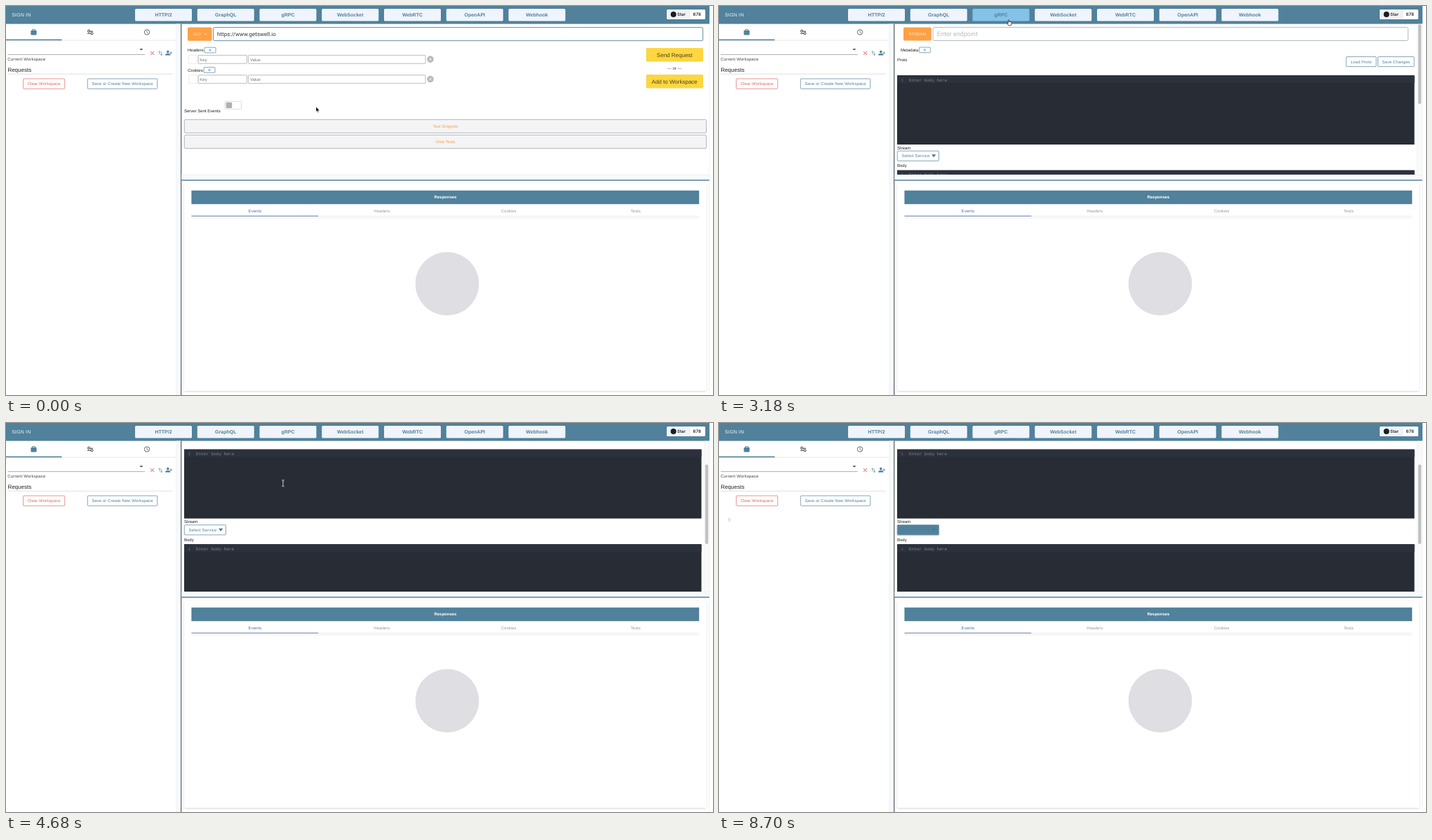
An HTML page for the animation above (9.82 s loop, 1008 by 556 pixels).

```html
<!DOCTYPE html>
<html lang="en">
<head>
<meta charset="utf-8">
<title>API client</title>
<style>
  html, body { margin: 0; width: 100%; height: 100%; overflow: hidden; background: #fff; }
  svg { display: block; width: 1008px; height: 556px; }
  text { font-family: "Liberation Sans", Arial, sans-serif; white-space: pre; text-rendering: geometricPrecision; }
  .ui { font-family: Roboto, sans-serif; }
  .badge { font-family: Inter, sans-serif; font-weight: 600; }
  .code { font-family: "Liberation Mono", monospace; }
  .bold { font-weight: 700; }
</style>
</head>
<body>
<svg id="stage" viewBox="0 0 1008 556">
  <defs>
    <clipPath id="view"><rect x="250" y="25.5" width="753" height="215.7"/></clipPath>
    <filter id="shadow" x="-5%" y="-5%" width="110%" height="110%">
      <feDropShadow dx="0" dy="1" stdDeviation="1.8" flood-color="#0a0a0a" flood-opacity=".16"/>
    </filter>
  </defs>
</svg>
<script>
const BLUE = '#51819b', INK = '#222', YELLOW = '#fdd640', ORANGE = '#ffa044';
const LOOP = 9820;
const stage = document.getElementById('stage');
let layer = stage;

function el(tag, attrs, text) {
  const node = document.createElementNS('http://www.w3.org/2000/svg', tag);
  for (const key in attrs) node.setAttribute(key, attrs[key]);
  if (text) node.textContent = text;
  return layer.appendChild(node);
}
function group(attrs, build) {
  const outer = layer, g = el('g', attrs);
  layer = g;
  build();
  layer = outer;
  return g;
}
// Box given by its edges.
const box = (x1, y1, x2, y2, fill, more) =>
  el('rect', { x: x1, y: y1, width: x2 - x1, height: y2 - y1, fill, ...more });
const outline = (x1, y1, x2, y2, stroke, rx = 1, fill = '#fff', width = .7) =>
  box(x1, y1, x2, y2, fill, { stroke, rx, 'stroke-width': width });
const path = (d, stroke, width = .8, fill = 'none', more) =>
  el('path', { d, stroke, 'stroke-width': width, fill, ...more });
const dot = (cx, cy, r, fill, more) => el('circle', { cx, cy, r, fill, ...more });
const label = (x, y, text, size = 6, fill = INK, more) =>
  el('text', { x, y, 'font-size': size, fill, ...more }, text);
const centered = (x, y, text, size, fill, more) =>
  label(x, y, text, size, fill, { 'text-anchor': 'middle', ...more });

function button(x1, y1, x2, y2, text, color, spacing = .05) {
  outline(x1, y1, x2, y2, color);
  centered((x1 + x2) / 2, (y1 + y2) / 2 + 2.1, text, 6, color, { 'letter-spacing': spacing });
}
function plus(x, y) {
  outline(x, y, x + 16, y + 7.7, BLUE);
  path(`M${x + 6} ${y + 3.9}h4m-2 -2v4`, BLUE, .6);
}

// Top bar
box(0, 0, 1003, 25.6, BLUE);
label(8.2, 15.3, 'SIGN IN', 7, '#eef4f8', { 'letter-spacing': .17 });
let grpcButton;
['HTTP/2', 'GraphQL', 'gRPC', 'WebSocket', 'WebRTC', 'OpenAPI', 'Webhook'].forEach((name, i) => {
  const x = 184 + i * 88.75;
  const r = box(x, 4, x + 81, 21.5, '#f0f4fc', { rx: 1.5 });
  if (name === 'gRPC') grpcButton = r;
  centered(x + 40.5, 15.3, name, 7, BLUE, { class: 'bold' });
});
box(942, 5, 997, 19, '#fff', { rx: 1.5 });
box(942.3, 5.3, 974.5, 18.7, '#f0f3f6', { rx: 1.5 });
path('M974.7 5V19', '#d5dade', .5);
dot(951.6, 12, 4, '#1b1f24');
label(957, 14.1, 'Star', 6, '#24292f', { class: 'badge' });
label(979.6, 14.1, '678', 6.2, '#24292f', { class: 'badge' });

// Sidebar
path('M0 49.1H243', '#dbdbdb', .6);
box(0, 47.6, 79.5, 49.2, BLUE);
path('M37.6 35v-1.3h3.8V35', BLUE, 1);
box(35.4, 35, 43.6, 41.4, BLUE, { rx: .8 });
dot(118, 35.7, 1.5, 'none', { stroke: '#333', 'stroke-width': 1 });
dot(122.5, 39.3, 1.5, 'none', { stroke: '#333', 'stroke-width': 1 });
path('M119.3 36.2H124M116 39.2h5', '#333', 1);
dot(201, 37.5, 3.7, 'none', { stroke: '#444', 'stroke-width': .8 });
path('M201 35.2v2.5l1.8 1.2', '#444', .7);
path('M2.5 69.4H198', '#8b8b8b', .7);
path('M190.4 61h5l-2.5 2.6z', 'none', 0, '#555');
path('M206 64.9l5 5m0 -5l-5 5', '#d9453f', .9);
path('M219 69V64.6m-1.5 1.5l1.5 -1.5l1.5 1.5M221.7 66v4.5m-1.5 -1.5l1.5 1.5l1.5 -1.5', BLUE, .7);
dot(230.8, 65.4, 1.8, BLUE);
path('M227.2 70.6v-.8q0 -2 3.6 -2t3.6 2v.8z', 'none', 0, BLUE);
path('M233.4 67h3.6m-1.8 -1.8v3.6', BLUE, .8);
label(2.3, 77.7, 'Current Workspace', 6, '#444', { 'letter-spacing': .15 });
label(2.4, 93.7, 'Requests', 8);
path('M2.5 97.3H238', '#d5d5d5', .7);
button(24.6, 104, 83.7, 118.3, 'Clear Workspace', '#dd6763', .07);
button(116.3, 104, 215.7, 118.3, 'Save or Create New Workspace', BLUE, .07);
box(242.6, 25.6, 249, 556, '#f8f9fb');
path('M242.6 25.6V556', '#e6e8ea', .5);
path('M249.7 25.6V556', '#4f5b65', 1.2);

function kvRow(name, x, y) {
  label(259, y + 2.3, name);
  plus(x, y - 3.8);
  outline(260.3, y + 7.2, 272.5, y + 19.4, '#dcdcdc', .5, '#fff', .6);
  outline(274.3, y + 7.4, 343.5, y + 19.2, '#8f8f8f', .8, '#fff', .6);
  outline(345.6, y + 7.4, 598, y + 19.2, '#8f8f8f', .8, '#fff', .6);
  label(276.3, y + 15.6, 'Key', 6, '#757575');
  label(348, y + 15.6, 'Value', 6, '#757575');
  dot(605, y + 13.1, 4.8, '#bababa');
  path(`M603.2 ${y + 11.3}l3.6 3.6m0 -3.6l-3.6 3.6`, '#fff', .8);
}

// HTTP composer
const httpPage = group({ 'clip-path': 'url(#view)' }, () => {
  box(259, 30.5, 293.6, 49.7, ORANGE, { rx: 1.5 });
  label(267, 42.2, 'GET', 5.6, '#ffe0bd');
  path('M282.8 39.3h3.6l-1.8 2z', 'none', 0, '#ffe0bd');
  outline(295.6, 30.6, 993.6, 49.6, BLUE, 1.8, '#fff', .9);
  label(301, 43.2, 'https://www.getswell.io', 8, '#363636', { class: 'ui' });
  kvRow('Headers', 283, 63);
  kvRow('Cookies', 282, 91.4);
  [['Send Request', 60], ['Add to Workspace', 98]].forEach(([text, y]) => {
    box(912.6, y, 994, y + 19.5, YELLOW, { rx: 1.5 });
    centered(953.2, y + 12.6, text, 8, '#4a4220');
  });
  centered(953.2, 90.9, '--- or ---', 6, '#333');
  label(254, 151.7, 'Server Sent Events');
  outline(312.2, 136.3, 335.6, 147.4, '#c4c4c4', 1, '#fff', .6);
  box(313.8, 137.8, 322.2, 146, '#b0b0b0', { rx: 1 });
  [['Test Snippets', 162.3], ['View Tests', 184.4]].forEach(([text, y]) => {
    outline(254.3, y, 998.5, y + 19.1, '#a3a6a9', 1.5, '#f4f4f6', .8);
    centered(626.4, y + 11.6, text, 6, '#f8a24c');
  });
});

// gRPC composer
function editor(y) {
  box(254, y, 991.5, y + 99, '#282c34');
  box(254, y + .8, 991.5, y + 11, '#2c323d');
  label(259.4, y + 8.7, '1', 6, '#636d83', { class: 'code' });
  label(271, y + 8.7, 'Enter body here', 6, '#80858f', { class: 'code' });
}
let content, thumb, selectFill;
const grpcPage = group({ 'clip-path': 'url(#view)' }, () => {
  content = group({}, () => {
    box(263, 30.5, 302.7, 49.6, ORANGE, { rx: 1.5 });
    centered(282.9, 42.1, 'STREAM', 5.8, '#ffe9d0');
    outline(305, 30.6, 982.4, 49.5, '#a9b4bc', 1.8, '#fff', .9);
    label(310.8, 43.2, 'Enter endpoint', 9, '#bcbcbc', { class: 'ui' });
    label(259, 65.1, 'Metadata');
    plus(285.4, 59);
    label(254, 78.9, 'Proto');
    button(894.2, 72.5, 937, 86.6, 'Load Proto', BLUE, .1);
    button(939.4, 72.5, 991, 86.6, 'Save Changes', BLUE);
    editor(99);
    label(254, 204.7, 'Stream');
    outline(254.3, 207.2, 313.4, 221.4, BLUE);
    selectFill = box(254, 206.9, 313.7, 221.7, BLUE, { rx: 1, 'stroke-width': .7 });
    label(260.4, 216.4, 'Select Service', 6, BLUE, { 'letter-spacing': .12 });
    path('M303 212.3h6.4l-3.2 4z', 'none', 0, '#4b7690');
    label(254, 230.1, 'Body');
    editor(234.6);
  });
  box(995.6, 25.6, 1002.6, 241.2, '#fafafa');
  path('M995.6 25.6V241.2', '#e8e8e8', .5);
  thumb = box(996.9, 26.2, 1001.2, 140, '#c1c1c1', { rx: 2.1 });
});

// Divider and responses
box(250.3, 241.2, 1003, 248.2, '#f8f9fb');
path('M250.3 241.4H1003', '#e3e5e8', .5);
path('M250.3 249H1003', BLUE, 1.5);
path('M1002.8 25.6V556', '#e6e8ea', .6);
box(254.4, 254, 998.4, 550, '#fff', { filter: 'url(#shadow)', rx: 1 });
box(264.4, 263.7, 988.2, 283.2, BLUE);
centered(626.4, 275.2, 'Responses', 6, '#fff', { class: 'bold' });
['Events', 'Headers', 'Cookies', 'Tests'].forEach((name, i) =>
  centered(354.9 + i * 180.9, 294.9, name, 6, i ? '#999' : '#5470a8', { 'letter-spacing': .04 }));
path('M264.4 300.4H988.2M264.4 302.8H988.2', '#dcdcdc', .6);
path('M264.4 300.2H445.3', '#5470a8', .9);
dot(629, 397, 45.3, '#dedee3');

// Pointers; the hot spot is at 0,0
const pointers = {
  arrow: group({}, () =>
    path('M0 0V7.3L1.7 5.8L2.8 8.4L4 7.9L2.9 5.4H5.1Z', '#fff', .55, '#000', { 'stroke-linejoin': 'round' })),
  hand: group({}, () =>
    path('M-.7 .7Q0 -.4 .7 .7V3L2.1 3.2L3.6 3.7Q4.4 4 4.2 5.2L3.5 8.3H-.4L-2.1 5.3Q-2.2 4.2 -.7 5Z',
      '#111', .7, '#fff', { 'stroke-linejoin': 'round' })),
  beam: group({}, () => {
    const d = 'M-1.9 -4.5Q0 -4.5 0 -3.5Q0 -4.5 1.9 -4.5M0 -3.5V3.5M-1.9 4.5Q0 4.5 0 3.5Q0 4.5 1.9 4.5M-1 1H1';
    path(d, '#fff', 1.5);
    path(d, '#111', .7);
  })
};

// Screen updates: first time, last time, count
const updates = [
  [0, 0, 1], [70, 980, 10], [1500, 1800, 4], [2700, 2780, 2], [3180, 4100, 10],
  [4170, 4300, 2], [4380, 4680, 4], [4770, 5070, 4], [5180, 5820, 8],
  [6000, 6200, 3], [7100, 7100, 1], [8000, 8150, 3], [8300, 8700, 5]
].flatMap(([a, b, n]) => Array.from({ length: n }, (_, i) => n > 1 ? a + (b - a) * i / (n - 1) : a));

const moves = [
  [0, 442, 144], [170, 447, 130], [370, 455, 95], [570, 450, 58], [780, 428, 25], [980, 415, 12],
  [3080, 415, 12], [3280, 411, 27], [3590, 398, 72], [3800, 394, 84], [4380, 394, 84],
  [4480, 395, 86], [4680, 395, 86], [4870, 394, 106], [5070, 389, 138], [5180, 385, 141],
  [5500, 351, 149], [5820, 325, 151], [6000, 315, 152], [6200, 308, 152.5], [7990, 308, 152.5],
  [8150, 247, 150], [8300, 224, 149], [8500, 92, 141], [8700, 13, 134]
];
const shapes = [[0, 'arrow'], [1500, 'hand'], [3280, 'arrow'], [4480, 'beam'], [5180, 'arrow'], [6000, 'hand'], [8000, 'arrow']];
const scrolls = [[3950, 0], [4100, 6], [4300, 38], [4480, 53], [4680, 61.5]];
const hovers = [[1400, 0], [1800, 1], [3180, 1], [3590, 0]];
const fills = [[5900, 0], [6200, 1]];
const fades = [[8450, 1], [8700, .13]];

function at(keys, t, col = 1) {
  const i = keys.findIndex(k => k[0] > t);
  if (i === 0) return keys[0][col];
  if (i < 0) return keys[keys.length - 1][col];
  const a = keys[i - 1], b = keys[i];
  return a[col] + (b[col] - a[col]) * (t - a[0]) / (b[0] - a[0]);
}
const mix = (a, b, k) => `rgb(${a.map((v, i) => Math.round(v + (b[i] - v) * k))})`;

function render(now) {
  const t = updates.findLast(u => u <= now + .01);
  const grpc = t >= 2700;
  httpPage.style.display = grpc ? 'none' : '';
  grpcPage.style.display = grpc ? '' : 'none';
  grpcButton.setAttribute('fill', mix([240, 244, 252], [133, 194, 232], at(hovers, t)));
  const y = at(scrolls, t);
  content.setAttribute('transform', `translate(0 ${-y})`);
  thumb.setAttribute('transform', `translate(0 ${y / 1.86})`);
  selectFill.setAttribute('opacity', at(fills, t));
  selectFill.setAttribute('stroke', t >= 7100 ? '#a5bfcd' : 'none');
  const shape = shapes.findLast(s => s[0] <= t)[1];
  for (const name in pointers) pointers[name].style.display = name === shape ? '' : 'none';
  pointers[shape].setAttribute('transform', `translate(${at(moves, t)} ${at(moves, t, 2)})`);
  pointers[shape].setAttribute('opacity', at(fades, t));
}

const start = performance.now();
function tick() {
  render((performance.now() - start) % LOOP);
  requestAnimationFrame(tick);
}
tick();
</script>
</body>
</html>
```
